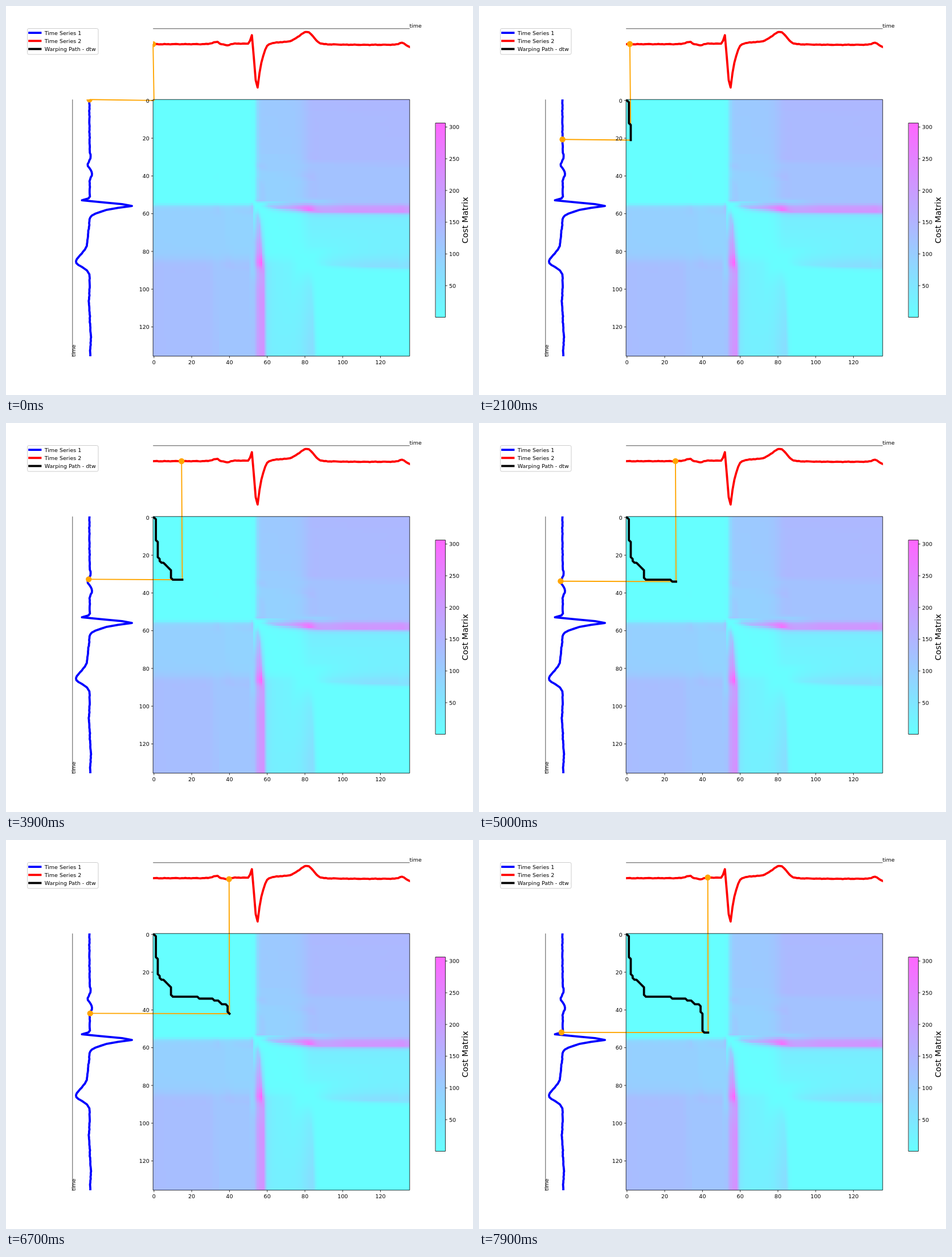
An HTML page with a canvas for the animation above (8000 ms loop, 820 px wide and 683 px high).

```html
<!DOCTYPE html>
<html lang="en">
<head>
<meta charset="utf-8">
<title>Warping path</title>
<style>
html, body { margin: 0; width: 100%; height: 100%; overflow: hidden; background: #fff; }
canvas { display: block; }
</style>
</head>
<body>
<canvas id="stage" width="820" height="683"></canvas>
<script>
const ctx = document.getElementById('stage').getContext('2d');
const FONT = '"DejaVu Sans", sans-serif';
const N = 136, STEP = 100, LOOP = 8000;
const X0 = 258.2, Y0 = 164.2, SIZE = 450.6;
const THIN = 0.8, THICK = 3.8;

// skewed bell: height at the centre, its own spread on each side
const bell = (centre, height, left, right) => i =>
  height * Math.exp(-0.5 * ((i - centre) / (i < centre ? left : right)) ** 2);

function series(bells) {
  return Array.from({ length: N }, (_, i) =>
    bells.reduce((sum, f) => sum + f(i), 0.5 * Math.sin(i * 2.3) * Math.cos(i * 1.1)));
}

// a heartbeat: small wave, spike with its recoil, slow hump, drift
const topWave = series([
  bell(34, 4, 2.5, 0.7), bell(39, -2.4, 1.2, 1), bell(45, 1, 3, 5),
  bell(52, 20, 0.65, 0.5), bell(54.55, -64, 1.1, 1), bell(56.5, -30, 1.5, 1.7),
  bell(67, 3.4, 3.5, 9), bell(81.3, 20.7, 4.5, 3),
  bell(112, -1.2, 14, 20), bell(131, 3.5, 1.5, 0.9), bell(136, -5, 1.7, 1)
]);
const sideWave = series([
  bell(8, 0.6, 9, 9), bell(30, -1.6, 1.5, 1), bell(34.7, 4, 1.3, 0.9), bell(39, -4.2, 1.6, 1.5),
  bell(53, 17, 0.5, 0.4), bell(55.7, -60, 1.1, 0.95), bell(57.6, -28, 1.6, 1.7),
  bell(74, 3.5, 5, 8), bell(85.6, 22.7, 4, 2.4),
  bell(107, 1.4, 4, 2.5), bell(126, -2, 5, 2.5), bell(134, -0.9, 4, 4)
]);

// turning points [column, row]; each leg runs diagonally, then straight
const LEGS = [[1,12],[2,21],[3,23],[5,24],[9,32],[23,33],[31,34],[34,35],[38,37],[39,41],[40,51],[43,52]];

function walk(legs) {
  const out = [[0, 0]];
  let x = 0, y = 0;
  for (const [ex, ey] of legs) {
    while (x !== ex || y !== ey) {
      x += Math.sign(ex - x);
      y += Math.sign(ey - y);
      out.push([x, y]);
    }
  }
  return out;
}
const path = walk(LEGS);

const along = i => i * SIZE / (N - 1);
const cell = i => (i + 0.5) * SIZE / N;
const topPt = i => [X0 + along(i), 67 - topWave[i]];
const sidePt = i => [147 - sideWave[i], Y0 + along(i)];
const cellPt = ([c, r]) => [X0 + cell(c), Y0 + cell(r)];
const topLine = topWave.map((_, i) => topPt(i));
const sideLine = sideWave.map((_, i) => sidePt(i));
const cool = v => `rgb(${102 + 153 * v},${255 - 153 * v},255)`;

// accumulated alignment cost of the two curves
function costImage() {
  const lift = h => h > 0 ? h * 1.22 : h;
  const a = sideWave.map(lift), b = topWave.map(lift);
  const cost = [];
  let max = 0;
  for (let r = 0; r < N; r++) {
    cost.push([]);
    for (let c = 0; c < N; c++) {
      const prev = r && c ? Math.min(cost[r - 1][c], cost[r][c - 1], cost[r - 1][c - 1])
        : r ? cost[r - 1][c] : c ? cost[r][c - 1] : 0;
      cost[r][c] = prev + (a[r] - b[c]) ** 2;
      max = Math.max(max, cost[r][c]);
    }
  }
  const img = document.createElement('canvas');
  img.width = img.height = N;
  const g = img.getContext('2d');
  cost.forEach((row, r) => row.forEach((d, c) => {
    g.fillStyle = cool(d / max);
    g.fillRect(c, r, 1, 1);
  }));
  return img;
}
const heat = costImage();

function stroke(points, color, width, cap = 'butt') {
  ctx.beginPath();
  points.forEach(p => ctx.lineTo(p[0], p[1]));
  ctx.strokeStyle = color;
  ctx.lineWidth = width;
  ctx.lineCap = cap;
  ctx.lineJoin = 'round';
  ctx.stroke();
}

function label(str, x, y, align = 'left', size = 9.5, turned = false) {
  ctx.save();
  ctx.translate(x, y);
  if (turned) ctx.rotate(-Math.PI / 2);
  ctx.font = `${size}px ${FONT}`;
  ctx.textAlign = align;
  ctx.fillStyle = '#000';
  ctx.fillText(str, 0, 0);
  ctx.restore();
}

function clipped(x, y, w, h, draw) {
  ctx.save();
  ctx.beginPath();
  ctx.rect(x, y, w, h);
  ctx.clip();
  draw();
  ctx.restore();
}
const inTop = draw => clipped(X0, 30, SIZE + 0.5, 130, draw);
const inSide = draw => clipped(100, Y0 - 0.2, 140, SIZE + 0.5, draw);

function dot([x, y]) {
  ctx.beginPath();
  ctx.arc(x, y, 5.2, 0, 2 * Math.PI);
  ctx.fillStyle = '#ffa500';
  ctx.fill();
}

function box(x, y, w, h) {
  ctx.strokeStyle = '#000';
  ctx.lineWidth = THIN;
  ctx.strokeRect(x, y, w, h);
}

function legend() {
  ctx.beginPath();
  ctx.roundRect(37.5, 39.5, 124.5, 45.5, 2.5);
  ctx.strokeStyle = '#ccc';
  ctx.lineWidth = 1;
  ctx.stroke();
  [['Time Series 1', '#00f'], ['Time Series 2', '#f00'], ['Warping Path - dtw', '#000']].forEach(([name, color], i) => {
    const y = 47.1 + i * 14.2;
    stroke([[41, y], [60.5, y]], color, THICK, 'square');
    label(name, 67.7, y + 3.8);
  });
}

function timeAxes() {
  stroke([[X0, 39.8], [X0 + SIZE, 39.8]], '#222', THIN);
  stroke([[116.8, Y0], [116.8, Y0 + SIZE]], '#222', THIN);
  label('time', 708.4, 37.7);
  label('time', 122.3, 616, 'left', 9.5, true);
}

function ticks() {
  for (let v = 0; v <= 120; v += 20) {
    const [x, y] = cellPt([v, v]), bottom = Y0 + SIZE;
    stroke([[x, bottom], [x, bottom + 3.4]], '#000', THIN);
    stroke([[X0 - 3.4, y], [X0, y]], '#000', THIN);
    label(v, x, 629.3, 'center');
    label(v, 251.8, y + 3.8, 'right');
  }
}

function colorbar() {
  const grad = ctx.createLinearGradient(0, 546.5, 0, 205.5);
  grad.addColorStop(0, cool(0));
  grad.addColorStop(1, cool(1));
  ctx.fillStyle = grad;
  ctx.fillRect(754.5, 205.5, 17, 341);
  box(754.5, 205.5, 17, 341);
  for (let v = 50; v <= 300; v += 50) {
    const y = 546.7 - v * 1.114;
    stroke([[771.5, y], [774.9, y]], '#000', THIN);
    label(v, 778, y + 3.6);
  }
  label('Cost Matrix', 811, 417, 'left', 14.4, true);
}

function draw(step) {
  const [c, r] = path[step];
  ctx.fillStyle = '#fff';
  ctx.fillRect(0, 0, 820, 683);
  ctx.imageSmoothingEnabled = false;
  ctx.drawImage(heat, X0, Y0, SIZE, SIZE);

  timeAxes();
  inTop(() => stroke(topLine, '#f00', THICK, 'square'));
  inSide(() => stroke(sideLine, '#00f', THICK, 'square'));

  stroke([topPt(c), cellPt(path[step]), sidePt(r)], '#ffa500', 1.9);
  if (step) clipped(X0, Y0, SIZE, SIZE, () =>
    stroke(path.slice(0, step + 1).map(cellPt), '#000', THICK, 'square'));
  box(X0, Y0, SIZE, SIZE);
  ticks();

  inTop(() => dot(topPt(c)));
  inSide(() => dot(sidePt(r)));
  legend();
  colorbar();
}

const start = performance.now();
function tick() {
  const t = (performance.now() - start) % LOOP;
  draw(Math.min(path.length - 1, Math.floor(t / STEP)));
  requestAnimationFrame(tick);
}
tick();
</script>
</body>
</html>
```
